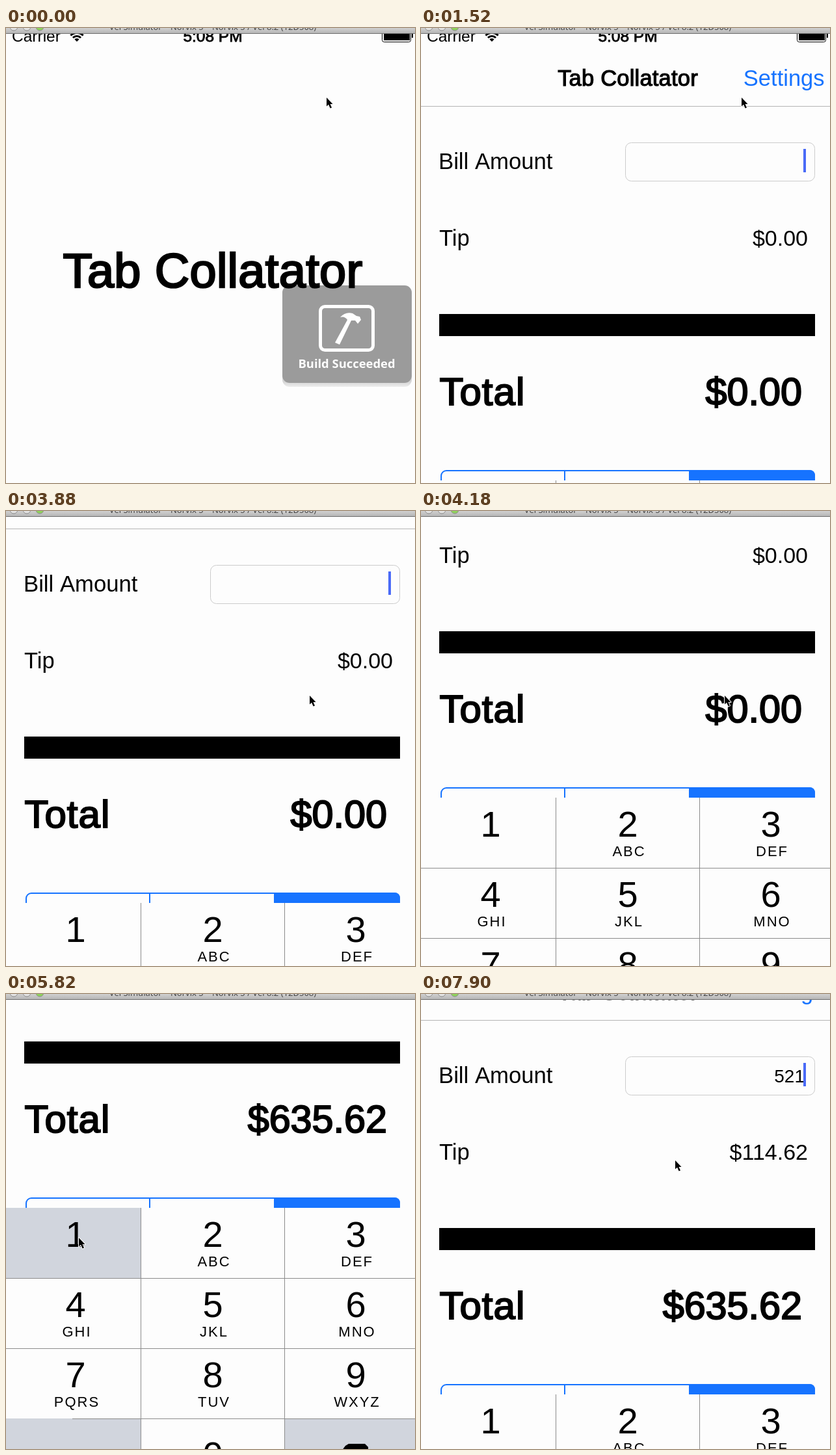
An HTML page with a canvas that plays this animation: 629x700 px, repeating every 8 s.

```html
<!DOCTYPE html>
<html lang="en">
<head>
<meta charset="utf-8">
<title>Tab Collatator</title>
<style>
html, body { margin: 0; width: 100%; height: 100%; overflow: hidden; background: #fdfdfd; }
canvas { display: block; }
</style>
</head>
<body>
<canvas id="stage" width="629" height="700"></canvas>
<script>
const c = document.getElementById('stage').getContext('2d');
const LOOP = 8000, STEP = 148.5;
const BG = '#fdfdfd', BLUE = '#1673ff', GREY = '#d1d5dd';
const SANS = '"Liberation Sans", Arial, sans-serif';
const NOTO = '"Noto Sans", sans-serif';

// Tracks are [step, value, ...] rows
const SCROLL = [[24, 0], [26, 93], [28, 255], [30, 367], [47, 367], [53, 80]];
const POINTER = [
  [20, 493, 107], [24, 467, 284], [28, 467, 284], [31, 310, 480], [32, 310, 480],
  [34, 333, 373], [35, 333, 373], [38, 112, 375], [39, 112, 375],
  [42, 299, 521], [47, 299, 521], [52, 391, 256]
];
const PRESSES = [[31, '5'], [35, '2'], [38, '1']];
const LETTERS = ['', 'ABC', 'DEF', 'GHI', 'JKL', 'MNO', 'PQRS', 'TUV', 'WXYZ'];
const EDGES = [0, 207, 428, 629], CENTRES = [107, 318, 538];

const clamp = v => Math.max(0, Math.min(1, v));

function at(track, k) {
  const i = track.findIndex(row => row[0] > k);
  if (i === 0) return track[0].slice(1);
  if (i < 0) return track[track.length - 1].slice(1);
  const a = track[i - 1], b = track[i], p = (k - a[0]) / (b[0] - a[0]);
  return a.slice(1).map((v, j) => v + (b[j + 1] - v) * p);
}

function rect(x, y, w, h, color) {
  c.fillStyle = color;
  c.fillRect(x, y, w, h);
}

function round(x, y, w, h, r) {
  c.beginPath();
  c.roundRect(x, y, w, h, r);
}

function poly(points, x = 0, y = 0) {
  c.beginPath();
  points.forEach(p => c.lineTo(x + p[0], y + p[1]));
  c.closePath();
}

// heavy thickens the regular weight to a medium one
function text(s, x, y, size, { align = 'left', color = '#000', heavy = 0, font = SANS, weight = 400, space = 0 } = {}) {
  c.font = `${weight} ${size}px ${font}`;
  c.textAlign = align;
  c.letterSpacing = space + 'px';
  c.fillStyle = c.strokeStyle = color;
  c.fillText(s, x, y);
  if (heavy) {
    c.lineWidth = size * heavy;
    c.lineJoin = 'miter';
    c.miterLimit = 3;
    c.strokeText(s, x, y);
  }
}

function statusBar() {
  text('Carrier', 9, 21, 24.5);
  text('5:08 PM', 318, 21, 24.5, { align: 'center', heavy: .035 });
  c.lineWidth = 3;
  c.strokeStyle = '#000';
  for (const r of [8.5, 13.5]) {
    c.beginPath();
    c.arc(109, 21, r, -2.36, -.78);
    c.stroke();
  }
  c.beginPath();
  c.moveTo(109, 21);
  c.arc(109, 21, 5, -2.36, -.78);
  c.fill();
  c.lineWidth = 1;
  round(578.5, 0.5, 44, 21, 3);
  c.stroke();
  rect(581, 2, 40, 17, '#000');
  rect(624, 8, 2, 7, '#000');
}

function segments() {
  c.fillStyle = c.strokeStyle = BLUE;
  c.lineWidth = 2;
  round(31, 681, 574, 56, 8);
  c.stroke();
  round(412, 680, 194, 58, [0, 8, 8, 0]);
  c.fill();
  rect(220, 681, 2, 56, BLUE);
  ['18%', '20%', '22%'].forEach((s, i) =>
    text(s, 126 + i * 191, 717, 26, { align: 'center', color: i === 2 ? BG : BLUE }));
}

function keypad(pressed) {
  rect(0, 696, 629, 432, BG);
  LETTERS.forEach((s, i) => {
    const col = i % 3, top = 696 + 108 * Math.floor(i / 3), n = String(i + 1);
    if (n === pressed) rect(EDGES[col], top, EDGES[col + 1] - EDGES[col], 108, GREY);
    text(n, CENTRES[col], top + 60, 56, { align: 'center' });
    text(s, CENTRES[col] + 2, top + 90, 22, { align: 'center', space: 2 });
  });
  rect(0, 1020, 207, 108, GREY);
  rect(429, 1020, 200, 108, GREY);
  text('0', 318, 1095, 56, { align: 'center' });
  poly([[510, 1078], [522, 1062], [527, 1059], [552, 1059], [557, 1064], [557, 1096], [524, 1096]]);
  c.fillStyle = '#000';
  c.fill();
  for (const x of [207, 428]) rect(x, 696, 1, 432, '#8c8c8c');
  for (const y of [804, 912]) rect(0, y, 629, 1, '#8c8c8c');
  rect(102, 1020, 527, 1, '#8c8c8c');
}

function caretAlpha(k) {
  if (k > 27) return 1;
  const period = 6.35, d = (k - 8.4 + period * 2.5) % period - period / 2;
  return clamp((Math.abs(d) - .8) / .65);
}

function calculator(k) {
  const typed = PRESSES.filter(p => k > p[0]).map(p => p[1]).join('');
  const press = PRESSES.find(p => k === p[0] || k === p[0] + 1);
  const bill = Number(typed), money = v => '$' + v.toFixed(2);
  text('Tab Collatator', 318, 88.5, 34.5, { align: 'center', heavy: .035, space: .2 });
  text('Settings', 620.5, 89, 34.5, { align: 'right', color: BLUE });
  rect(0, 120, 629, 1, '#b4b4b4');

  text('Bill Amount', 27, 217, 34.7);
  c.strokeStyle = '#ccc';
  c.lineWidth = 1;
  round(314.5, 176.5, 291, 59, 9);
  c.stroke();
  text(typed, 590, 216, 28, { align: 'right' });
  c.globalAlpha = caretAlpha(k);
  rect(588, 186, 4, 36, '#4a6bf7');
  c.globalAlpha = 1;

  text('Tip', 28, 335, 34.5);
  text(money(bill * .22), 595, 335, 34, { align: 'right' });
  rect(28, 440, 578, 34, '#000');
  text('Total', 28.5, 579.5, 60, { heavy: .035, space: 1 });
  text(money(bill * 1.22), 586, 579.5, 59.3, { align: 'right', heavy: .035 });
  segments();
  if (k > 5) keypad(press && press[1]);
}

// The launch screen fades away over the calculator
function splash(gone) {
  if (gone === 1) return;
  c.globalAlpha = 1 - gone;
  rect(0, 24, 629, 676, BG);
  c.globalAlpha = 1;
  const v = Math.round(253 * gone);
  if (gone < 1) text('Tab Collatator', 318, 399, 74, { align: 'center', heavy: .035, space: .3, color: `rgb(${v},${v},${v})` });
}

function buildNotice(alpha) {
  if (!alpha) return;
  c.globalAlpha = alpha;
  const shade = c.createLinearGradient(0, 544, 0, 553);
  shade.addColorStop(0, '#d4d4d4');
  shade.addColorStop(1, '#f0f0f0');
  c.fillStyle = shade;
  round(425, 500, 199, 52, 11);
  c.fill();
  c.fillStyle = BG;
  round(425, 480, 199, 66, 11);
  c.fill();
  c.fillStyle = 'rgba(0,0,0,.39)';
  round(425, 396, 199, 150, 11);
  c.fill();
  c.strokeStyle = c.fillStyle = '#fff';
  c.lineWidth = 5;
  round(483.5, 428.5, 81, 67, 7);
  c.stroke();
  // hammer
  c.beginPath();
  c.moveTo(506, 484);
  c.lineTo(525, 449);
  c.quadraticCurveTo(521, 443, 514, 445);
  c.quadraticCurveTo(522, 436, 533, 439);
  c.lineTo(539, 443);
  c.lineTo(544, 444);
  c.lineTo(546, 449);
  c.lineTo(541, 455);
  c.lineTo(537, 450);
  c.lineTo(531, 450);
  c.lineTo(513, 487);
  c.fill();
  text('Build Succeeded', 524, 523, 18.4, { align: 'center', color: '#fff', font: NOTO, weight: 700 });
  c.globalAlpha = 1;
}

function titleBar() {
  const g = c.createLinearGradient(0, 0, 0, 8);
  g.addColorStop(0, '#d0d0d0');
  g.addColorStop(1, '#b6b6b6');
  rect(0, 0, 629, 8, g);
  rect(0, 8, 629, 1, '#6e6e6e');
  ['#e2e2e2', '#e2e2e2', '#8fd35a'].forEach((color, i) => {
    c.beginPath();
    c.arc(12 + i * 20, -2, 6, 0, 7);
    c.fillStyle = color;
    c.fill();
    c.strokeStyle = '#8a8a8a';
    c.lineWidth = 1;
    c.stroke();
  });
  text('Vel Simulator – Norvix 5 – Norvix 5 / Vel 8.2 (12D508)', 318, 3, 13,
    { align: 'center', color: '#444', font: NOTO });
}

function pointer(x, y) {
  poly([[0, 0], [0, 13.5], [3, 10.8], [5.6, 16.5], [8, 15.4], [5.5, 10], [9.5, 10]], x, y);
  c.lineJoin = 'round';
  c.lineWidth = 2;
  c.strokeStyle = '#fff';
  c.stroke();
  c.fillStyle = '#000';
  c.fill();
}

function draw(ms) {
  const k = Math.floor((ms % LOOP + 5) / STEP);
  rect(0, 0, 629, 700, BG);
  c.save();
  c.translate(0, -Math.round(at(SCROLL, k)[0]));
  calculator(k);
  splash(clamp((k - 2) / 2.5));
  statusBar();
  c.restore();
  buildNotice(clamp(1 - k / 3));
  titleBar();
  pointer(...at(POINTER, k).map(Math.round));
}

const start = performance.now();
function tick() {
  draw(performance.now() - start);
  requestAnimationFrame(tick);
}
tick();
</script>
</body>
</html>
```
